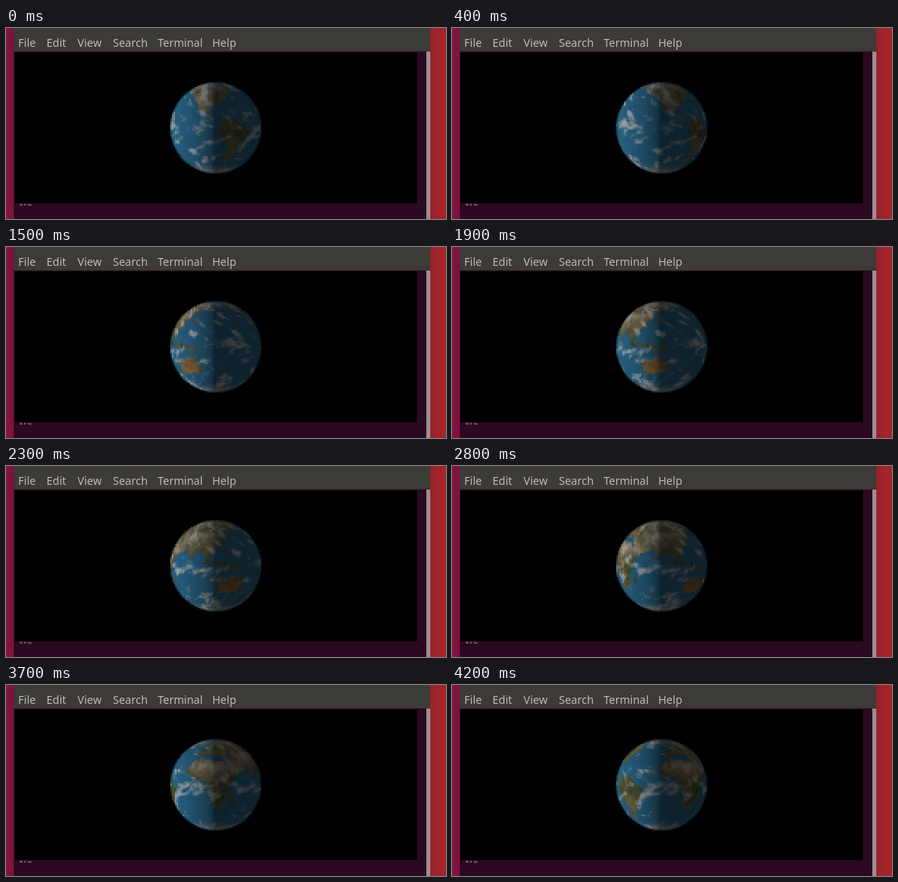
An HTML page with a canvas that plays this animation: 560 px wide and 243 px high, repeating every 4300 ms.

```html
<!DOCTYPE html>
<html lang="en">
<head>
<meta charset="utf-8">
<title>Terminal globe</title>
<style>
  html, body { margin: 0; width: 100%; height: 100%; overflow: hidden; background: #300a24; }
  svg, canvas { position: absolute; display: block; }
  svg { left: 0; top: 0; }
  canvas { left: 11px; top: 31px; width: 512px; height: 192px; image-rendering: pixelated; }
  .menu { font: 14px "Noto Sans", "Open Sans", sans-serif; fill: #bfbab0; }
  .fps { font: 3.32px "DejaVu Sans Mono", monospace; fill: #d8d0d5; }
</style>
</head>
<body>
<svg width="560" height="243" viewBox="0 0 560 243">
  <defs>
    <linearGradient id="left">
      <stop stop-color="#841640"/><stop offset="1" stop-color="#7a123c"/>
    </linearGradient>
    <linearGradient id="right">
      <stop stop-color="#98212a"/><stop offset=".7" stop-color="#a5242c"/>
    </linearGradient>
  </defs>
  <rect width="10" height="243" fill="url(#left)"/>
  <rect x="540" width="20" height="243" fill="url(#right)"/>
  <rect x="10" width="530" height="30" fill="#3c3b37"/>
  <rect x="10" y="29" width="530" height="1" fill="#32312d"/>
  <rect x="10" y="30" width="525" height="213" fill="#2b0920"/>
  <rect x="535" y="30" width="5" height="213" fill="#9a8e94"/>
  <g class="menu">
    <text x="15.5" y="24">File</text>
    <text x="51.5" y="24">Edit</text>
    <text x="91" y="24">View</text>
    <text x="136" y="24">Search</text>
    <text x="193" y="24">Terminal</text>
    <text x="262.5" y="24">Help</text>
  </g>
  <text class="fps" x="17" y="226.3">30.0 fps</text>
</svg>
<canvas id="screen" width="256" height="96"></canvas>
<script>
const COLS = 256, ROWS = 96, RADIUS = 29.3;
const MAP_W = 360, MAP_H = 180;
const LOOP = 4300, TICK = 100, HELD_TICKS = [7, 27, 30];
const START_LON = -86, STEP_LON = -7.4;
const DEG = 180 / Math.PI;

const clamp = (v, lo = 0, hi = 1) => Math.min(hi, Math.max(lo, v));
const wrap = (v, n) => ((v % n) + n) % n;
const smooth = (a, b, v) => { const t = clamp((v - a) / (b - a)); return t * t * (3 - 2 * t); };
const mix = (a, b, t) => a.map((v, i) => v + (b[i] - v) * t);
const bump = (x, y, cx, cy, w, h) => Math.exp(-(((x - cx) / w) ** 2) - ((y - cy) / h) ** 2);

function hash(x, y, seed) {
  let h = Math.imul(x, 374761393) ^ Math.imul(y, 668265263) ^ Math.imul(seed, 974634541);
  h = Math.imul(h ^ (h >>> 13), 1274126177);
  return ((h ^ (h >>> 16)) >>> 0) / 4294967296;
}

// Value noise that wraps around in u; nx and ny are the cells across the map.
function noise(u, v, nx, ny, seed) {
  const x = u * nx, y = v * ny, ix = Math.floor(x), iy = Math.floor(y);
  const fx = smooth(0, 1, x - ix), fy = smooth(0, 1, y - iy);
  const at = (i, j) => hash((ix + i) % nx, iy + j, seed);
  const top = at(0, 0) + (at(1, 0) - at(0, 0)) * fx;
  const bottom = at(0, 1) + (at(1, 1) - at(0, 1)) * fx;
  return top + (bottom - top) * fy;
}

const fbm = (u, v, nx, ny, seed) =>
  noise(u, v, nx, ny, seed) * .5 + noise(u, v, nx * 2, ny * 2, seed + 1) * .3 +
  noise(u, v, nx * 4, ny * 4, seed + 2) * .2;

// Coarse outlines as longitude, latitude; noise roughens their coasts later.
function drawLandMask() {
  const mask = document.createElement('canvas');
  mask.width = MAP_W;
  mask.height = MAP_H;
  const g = mask.getContext('2d');
  g.setTransform(1, 0, 0, -1, 180, 90);
  const land = (...p) => {
    g.beginPath();
    for (let i = 0; i < p.length; i += 2) g.lineTo(p[i], p[i + 1]);
    g.fill();
  };
  const island = (lon, lat, w, h, tilt = 0) => {
    g.beginPath();
    g.ellipse(lon, lat, w, h, tilt, 0, 7);
    g.fill();
  };
  // North and South America
  land(-165, 62, -90, 72, -58, 52, -81, 28, -97, 27, -92, 17, -79, 8, -106, 21, -124, 42);
  land(-79, 8, -62, 10, -36, -7, -50, -28, -70, -54, -71, -18, -81, -5);
  // Africa
  land(-8, 34, 32, 31, 50, 11, 34, -26, 19, -35, 9, 4, -8, 5, -17, 18);
  // Eurasia
  land(-9, 39, 10, 57, 25, 70, 105, 76, 179, 67, 138, 50, 121, 29, 108, 14, 103, 1, 90, 22,
    78, 8, 70, 22, 45, 12, 35, 32, 25, 39);
  // Australia
  land(114, -22, 142, -12, 153, -28, 146, -38, 115, -34);
  island(-42, 72, 13, 9);
  island(47, -19, 2.5, 7, -.3);
  island(139, 37, 2.5, 7, -.7);
  island(173, -41, 2.5, 6, -.6);
  for (let i = 0; i < 8; i++) {
    island(98 + i * 6.5, 2 - i + hash(i, 0, 3) * 6, 2 + hash(i, 1, 3) * 3, 2 + hash(i, 2, 3) * 2, -.5);
  }
  return g.getImageData(0, 0, MAP_W, MAP_H).data;
}

function landColor(lon, lat, grain) {
  const desert = bump(lon, lat, 22, 23, 46, 11) + bump(lon, lat, -110, 38, 13, 14) +
    bump(lon, lat, 85, 42, 28, 8) * .6;
  let c = mix([84, 84, 50], [112, 107, 76], clamp(Math.abs(lat) / 40));
  c = mix(c, [180, 165, 142], clamp(desert));
  c = mix(c, [142, 108, 66], bump(lon, lat, 132, -25, 22, 14));
  c = mix(c, [138, 134, 122], smooth(50, 70, lat));
  return c.map(v => v * (.65 + grain * .7));
}

function buildMap() {
  const mask = drawLandMask(), map = [];
  for (let y = 0; y < MAP_H; y++) {
    for (let x = 0; x < MAP_W; x++) {
      const lon = x - 180, lat = 90 - y, u = x / MAP_W, v = y / MAP_H;
      const grain = fbm(u, v, 45, 22, 20);
      const shoreX = wrap(Math.round(x + (fbm(u, v, 40, 20, 50) - .5) * 11), MAP_W);
      const shoreY = clamp(Math.round(y + (fbm(u, v, 40, 20, 60) - .5) * 11), 0, MAP_H - 1);
      const land = mask[(shoreY * MAP_W + shoreX) * 4 + 3] / 255;
      let c = mix([40, 104, 142], [48, 114, 150], grain);
      c = mix(c, landColor(lon, lat, grain), land);

      const polar = smooth(50, 74, Math.abs(lat)) * (lat < 0 ? .8 : .5);
      c = mix(c, [184, 182, 178], polar * (.6 + grain * .7));

      // Cloudy at the equator and near 60 degrees, clear in between.
      const slant = wrap(u + Math.abs(v - .5) * .35, 1);
      const belt = Math.cos(6 * lat / DEG) * .045 - bump(lon, lat, 20, 22, 45, 13) * .2 -
        bump(lon, lat, 132, -25, 20, 12) * .12;
      const cover = fbm(slant, v, 24, 15, 7) + belt;
      c = mix(c, [198, 200, 200], smooth(.53, .8, cover) * .85);
      map.push(c);
    }
  }
  return map;
}

const ctx = document.getElementById('screen').getContext('2d');
const image = ctx.createImageData(COLS, ROWS);
const map = buildMap();

function sampleMap(lon, lat) {
  const x = wrap(lon + 180, MAP_W), y = clamp(90 - lat, 0, MAP_H - 1.01);
  const ix = Math.floor(x), iy = Math.floor(y);
  const at = (i, j) => map[(iy + j) * MAP_W + (ix + i) % MAP_W];
  return mix(mix(at(0, 0), at(1, 0), x - ix), mix(at(0, 1), at(1, 1), x - ix), y - iy);
}

function drawGlobe(centerLon) {
  for (let row = 0; row < ROWS; row++) {
    for (let col = 0; col < COLS; col++) {
      const nx = (col + .5 - COLS / 2) / RADIUS, ny = (row + .5 - ROWS / 2) / RADIUS;
      const o = (row * COLS + col) * 4, r = Math.hypot(nx, ny);
      image.data[o + 3] = 255;
      if (r >= 1) continue;
      const nz = Math.sqrt(1 - r * r);
      const color = sampleMap(centerLon + Math.atan2(nx, nz) * DEG, -Math.asin(ny) * DEG);
      const edge = clamp((1 - r) * RADIUS / 1.4 + .2);
      const light = (.31 + .6 * Math.sqrt(Math.max(0, -nx - .04))) * edge;
      for (let k = 0; k < 3; k++) image.data[o + k] = color[k] * light;
    }
  }
  ctx.putImageData(image, 0, 0);
}

let shown = -1;
function frame() {
  const tick = Math.floor(performance.now() % LOOP / TICK);
  const step = tick - HELD_TICKS.filter(held => tick >= held).length;
  if (step !== shown) drawGlobe(START_LON + step * STEP_LON);
  shown = step;
  requestAnimationFrame(frame);
}
frame();
</script>
</body>
</html>
```
